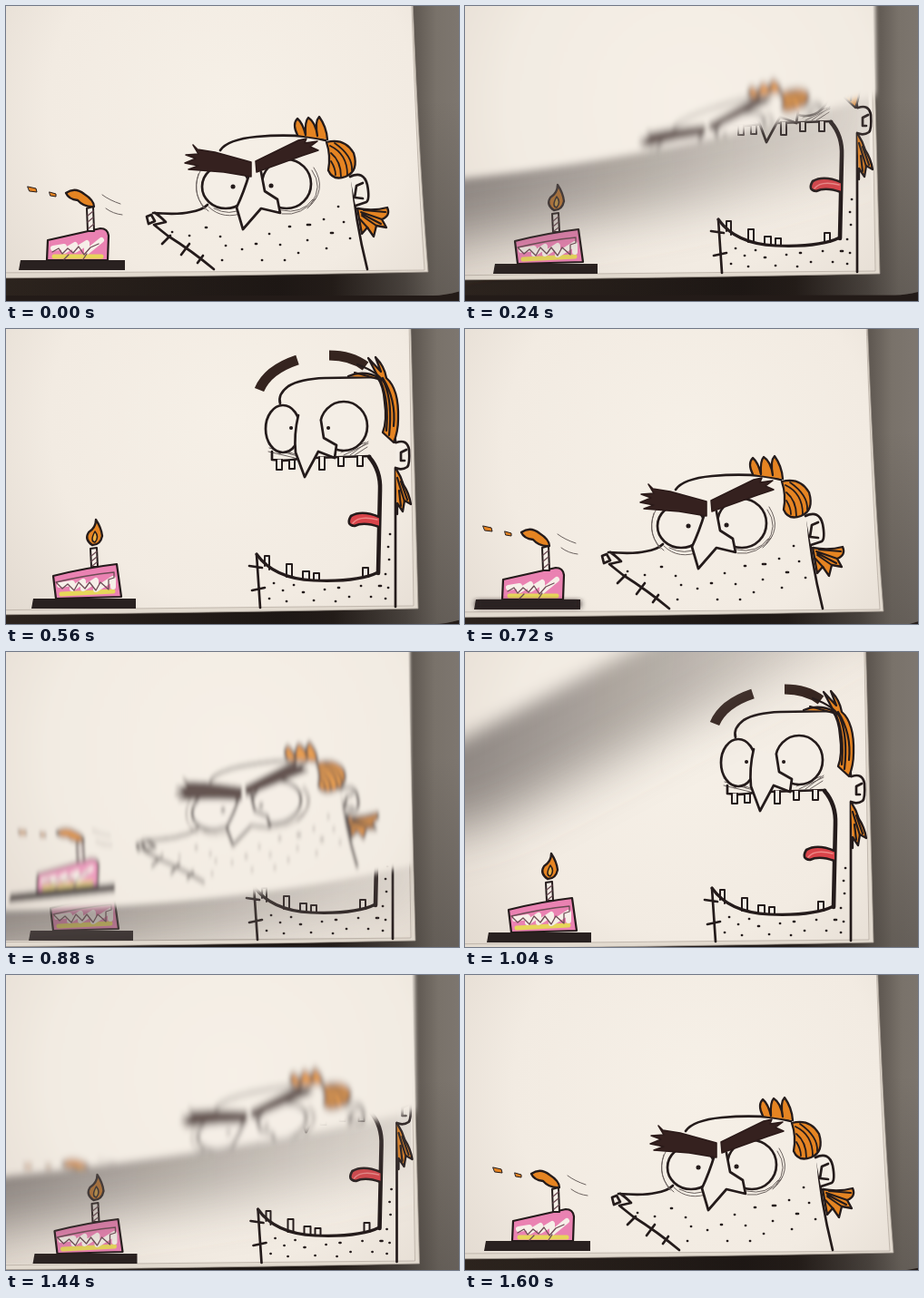
An HTML page for the animation above (1.68 s loop, 499 px wide and 325 px high).

```html
<!DOCTYPE html>
<html lang="en">
<head>
<meta charset="utf-8">
<title>Flipbook birthday</title>
<style>
html, body { margin: 0; width: 100%; height: 100%; overflow: hidden; background: #231b18; }
svg { display: block; width: 499px; height: 325px; }
.ink { fill: none; stroke: #241b1b; stroke-width: 2.7; stroke-linecap: round; stroke-linejoin: round; }
.thin { stroke-width: 1; stroke: #6b625f; }
.bold { stroke-width: 3.2; }
.heavy { stroke-width: 4.6; }
.dots { stroke-width: 2.7; }
.white { fill: #f4eee6; }
.hair { fill: #e58422; stroke-width: 2.3; }
.brow { fill: #35211f; stroke: #2b1a19; stroke-width: 1.5; }
.arch { stroke: #35241f; stroke-width: 11; stroke-linecap: butt; }
.pink { fill: #ea82b2; stroke-width: 2.2; }
.plate { fill: #292120; stroke: none; }
.icing { stroke: #f6efe8; stroke-width: 6; }
.lemon { stroke: #e6d65a; stroke-width: 5; }
.mark { stroke-width: 1.3; stroke: #6d4c55; }
</style>
</head>
<body>
<svg viewBox="0 0 499 325">
<defs>
  <radialGradient id="paper" gradientUnits="userSpaceOnUse" cx="250" cy="110" r="370">
    <stop offset="0" stop-color="#f6f0e7"/>
    <stop offset=".55" stop-color="#f2ebe2"/>
    <stop offset="1" stop-color="#ddd4ca"/>
  </radialGradient>
  <linearGradient id="mat" gradientUnits="userSpaceOnUse" x1="0" y1="0" x2="499" y2="0">
    <stop offset="0" stop-color="#30261f"/>
    <stop offset=".6" stop-color="#1d1613"/>
    <stop offset=".72" stop-color="#241c18"/>
    <stop offset=".88" stop-color="#544d47"/>
    <stop offset=".95" stop-color="#79726a"/>
    <stop offset="1" stop-color="#7d766f"/>
  </linearGradient>
  <linearGradient id="dusk" x1="0" y1="0" x2="0" y2="1">
    <stop offset=".4" stop-color="#1f1b19" stop-opacity="0"/>
    <stop offset="1" stop-color="#1f1b19" stop-opacity=".25"/>
  </linearGradient>
  <linearGradient id="shade" gradientUnits="userSpaceOnUse" x1="0" y1="0" x2="450" y2="0">
    <stop offset="0" stop-color="#5e5753" stop-opacity=".66"/>
    <stop offset=".5" stop-color="#6e6661" stop-opacity=".46"/>
    <stop offset="1" stop-color="#827a75" stop-opacity=".2"/>
  </linearGradient>
  <filter id="soft" filterUnits="userSpaceOnUse" x="-200" y="-400" width="900" height="1000"><feGaussianBlur stdDeviation="28"/></filter>
  <filter id="motion" filterUnits="userSpaceOnUse" x="-60" y="-90" width="620" height="500"><feGaussianBlur id="blur"/></filter>
  <filter id="smear" filterUnits="userSpaceOnUse" x="-20" y="260" width="200" height="60"><feGaussianBlur stdDeviation="3 2"/></filter>
  <clipPath id="cut"><path id="cutPath"/></clipPath>
  <clipPath id="sheetArea"><path d="M0 0H442L450 318H0Z"/></clipPath>

  <g id="blowing" class="ink">
    <path class="plate" d="M16 280H131V291H14Z"/>
    <path class="pink" d="M46 258L104 245Q112 245 113 253L112 280H45Z"/>
    <path class="lemon" d="M53 276H105"/>
    <path class="icing" d="M52 267L64 265V270L76 263V269L89 261V271L105 258"/>
    <path class="mark" d="M51 271l7-4 4 6 6-6 6 5 6-7 6 9 7-8 9-4M64 279l5-5M85 279l4-6"/>
    <path class="white" stroke-width="2" d="M89 223L96 221L97 248H90Z"/>
    <path class="mark" d="M90 231l6-5M90 238l6-5M91 245l6-5"/>
    <path class="hair" stroke-width="2" d="M66 206Q76 199 86 207Q97 214 97 221Q86 222 79 214Q69 213 66 206Z"/>
    <path class="hair" style="stroke-width:1" d="M24 199l9 2 1 4-8-1zM48 205l7 2v3l-6-1z"/>
    <path class="thin" d="M106 208Q114 214 126 218M110 223Q118 229 128 230"/>

    <path d="M236 159Q244 147 276 144Q323 140 352 148M162 228Q191 230 203 227Q216 225 222 219M155 232l5-2 4 7-7 3zM164 228Q169 231 176 238L163 241L178 253Q205 270 229 290M181 253l-9 9M202 262l-9 12M217 275l-6 8"/>
    <path d="M381 187Q384 234 398 290"/>
    <path class="thin" d="M215 180Q202 202 219 224M212 185Q204 211 223 226M223 221Q239 237 264 227M229 223Q247 232 260 223M337 181Q350 199 336 218M339 178Q355 203 332 223M304 229Q326 232 342 211M303 225Q326 230 338 213"/>
    <ellipse class="white" cx="242" cy="199" rx="26" ry="24"/>
    <ellipse class="white" cx="309" cy="196" rx="27" ry="27"/>
    <path d="M250 199h.1M292 198h.1" stroke-width="5"/>
    <path class="white" d="M268 185Q262 205 254 222L261 246L281 223L302 228L299 213L285 204L281 183"/>
    <path class="brow" d="M206 153L211 158L230 161L270 172V188L240 183L201 180L212 176L197 173L209 168L198 164L212 163Z"/>
    <path class="brow" d="M275 171L322 148L331 146L329 151L343 149L335 155L344 159L326 165L276 183Z"/>
    <path class="hair" d="M321 142Q315 130 321 124Q327 129 330 142Q329 127 333 123Q341 128 343 143Q340 127 345 122Q353 133 354 147"/>
    <path class="hair" d="M353 150Q373 145 383 162Q389 182 374 188Q360 193 355 181Q358 165 353 150Z"/>
    <path stroke-width="1.8" d="M357 154Q376 163 376 186M362 151Q382 165 381 181M358 162Q369 171 369 188M358 171Q363 179 363 186"/>
    <path class="white" d="M379 188Q394 181 398 197Q401 213 397 216L385 220M393 195L386 198L384 211L393 212"/>
    <path class="hair" d="M387 223Q405 226 420 222Q424 231 414 235L419 244L408 242L405 254L398 244L392 251Z"/>
    <path stroke-width="2" d="M391 227L414 235M392 231L408 242M394 225L418 227M390 235L399 245M392 229L413 240"/>
    <path class="dots" d="M183 249h.1M202 253h.1M220 244h1M236 254h.1M242 264h.1M260 268h.1M275 262h1M282 280h.1M290 251h.1M302 263h.1M312 243h1M322 272h.1M332 241h3M332 258h.1M350 235h.1M358 250h2M366 221h.1M372 238h.1M353 267h.1M238 280h.1M379 256h.1M307 280h.1"/>
  </g>

  <g id="gaping" class="ink">
    <path class="plate" d="M29 309H142V320H27Z"/>
    <path class="pink" d="M51 284Q87 275 121 271L126 307L54 309Z"/>
    <path class="lemon" d="M60 304L117 301"/>
    <path class="icing" d="M58 294L72 292V298L84 290V298L98 289V299L117 287V296"/>
    <path class="mark" d="M54 291Q88 283 118 280V286L112 288V299L103 291L98 300L91 291L86 298L79 291L74 300L67 293L61 298Z"/>
    <path class="white" stroke-width="2" d="M92 254L99 253L100 274H93Z"/>
    <path class="mark" d="M93 262l6-5M93 268l6-5M94 273l5-4"/>
    <path class="hair" d="M98 222Q104 231 105 240Q103 250 94 250Q85 244 90 236Q98 231 98 222Z"/>
    <path d="M97 235Q102 241 97 247Q91 246 97 235Z" fill="#f0b040" stroke-width="1.5"/>

    <path d="M301 94Q298 84 310 75Q323 67 350 66L412 65Q426 105 428 137M428 166V318M275 260L279 319M267 273L281 275M270 300L284 297"/>
    <path class="thin" d="M288 139l32 12M289 143l31 9M292 135l21 15M368 148l27-11M371 151l27-13M378 151l20-15M383 151l14-9M288 147l29 7M300 150l10-6"/>
    <ellipse class="white" cx="304" cy="122" rx="19" ry="26"/>
    <ellipse class="white" cx="371" cy="119" rx="26" ry="27"/>
    <path d="M313 121h.1M354 121h.1" stroke-width="4"/>
    <path d="M292 147V156Q308 158 321 155M338 154L400 152"/>
    <path class="heavy" d="M399 153Q412 168 411 190L409 281"/>
    <path class="white" stroke-width="2" d="M297 156v11h6v-11M311 157v9h6v-9M344 153v14h6v-14M365 153v10h6v-10M386 152v11h6v-11"/>
    <path class="white" d="M321 107Q316 128 318 148L328 175L343 147L361 154L363 140L349 132L346 113"/>
    <path d="M410 230Q393 224 383 229Q373 228 379 218Q391 211 410 219" fill="#d9444a"/>
    <path d="M381 226Q388 217 408 222" stroke="#ee8a88" stroke-width="1.5"/>
    <path class="white" stroke-width="2" d="M284 273v-11h5v15M308 285v-14h6v15M326 288v-9h7v10M338 289v-8h6v8M392 286v-11h6v10"/>
    <path class="bold" d="M275 260Q294 287 338 289Q387 291 409 280"/>
    <path class="arch" d="M278 79Q287 57 320 46"/>
    <path class="arch" d="M355 41Q379 41 395 53"/>
    <path class="hair" d="M376 64Q392 57 409 65L398 44L412 59L406 43Q416 53 418 66Q432 78 431 111Q431 125 426 137L414 126Q419 113 416 92Q415 75 408 65"/>
    <path stroke-width="2.2" d="M386 51Q410 60 416 72Q425 94 421 129M414 66Q429 90 426 119M383 60L412 68M412 70Q421 92 418 124"/>
    <path class="hair" d="M428 165Q434 174 437 184Q443 193 445 205L438 201L436 213L430 204V216"/>
    <path stroke-width="2.2" d="M430 176L438 202M432 190L434 207M434 180L441 200"/>
    <path class="white" d="M429 137Q441 133 443 145Q444 161 441 164Q435 168 428 165M440 145L434 148V157L438 157"/>
    <path class="dots" d="M294 292h.1M304 300h.1M289 309h.1M316 294h.1M326 302h1M338 311h.1M350 299h.1M365 297h1M377 307h.1M390 295h.1M401 307h.1M410 295h2M417 282h.1M421 266h.1M420 252h.1M417 309h.1M308 312h.1M362 312h.1M420 297h.1M422 238h.1"/>
  </g>
</defs>

<rect width="499" height="325" fill="#231b18"/>
<g id="desk">
  <path d="M-40-40H560V287Q505 319 470 319H-40Z" fill="url(#mat)"/>
  <path d="M-40-40H560V287Q505 319 470 319H-40Z" fill="url(#dusk)"/>
</g>

<g id="pageB">
  <path d="M-30-60H443L453 320Q200 325-30 327Z" fill="#e2dacf" stroke="#a39a91" stroke-width=".8"/>
  <path d="M-30-60H442L448 317Q200 319-30 322Z" fill="url(#paper)" stroke="#b8aea4" stroke-width=".8"/>
  <use href="#gaping"/>
</g>
<g clip-path="url(#sheetArea)"><path id="shadow" fill="none" stroke="url(#shade)" filter="url(#soft)"/></g>
<g id="pageA">
  <path d="M-30-60H446Q453 145 465 293Q220 298-30 300Z" fill="#e2dacf" stroke="#a39a91" stroke-width=".8"/>
  <path d="M-30-60H445Q451 145 461 291Q220 293-30 294Z" fill="url(#paper)" stroke="#b8aea4" stroke-width=".8"/>
  <use href="#blowing"/>
  <path id="smudge" d="M16 285H131" stroke="#292120" stroke-width="9" filter="url(#smear)"/>
</g>
<g id="lift" filter="url(#motion)">
  <path id="curl" fill="url(#paper)"/>
  <g clip-path="url(#cut)"><use id="bent" href="#blowing" opacity=".75"/></g>
</g>
</svg>
<script>
const STEP = 80, COUNT = 21;
const $ = id => document.getElementById(id);

// [step, x, y] drift of each drawing under the camera
const driftA = [[0, 0, 0], [2, 3, -1], [8, -3, 16], [9, -4, 18], [13, -2, 19], [18, 3, 16], [20, 7, 13]];
const driftB = [[0, 4, -26], [3, 4, -25], [7, 1, -12], [11, -2, -2], [13, -3, 0], [16, 0, 0], [20, 5, -4]];

// sheet edge heights (left, control, right), squash, slant and drop of its drawing, blur, shadow width
const rising = [
  [285, 280, 235, .85, -.1, 30, 3, 90],
  [190, 162, 98, .6, -.275, 103, 4, 130],
  [95, -35, -140, .4, -.5, -300, 11, 190]
];
const falling = [222, 196, 150, .72, -.16, 70, 4, 110];
const flips = { 2: rising[0], 3: rising[1], 4: rising[2], 8: falling,
  11: rising[0], 12: rising[1], 13: rising[2], 18: falling };

function at(keys, n) {
  const i = Math.max(1, keys.findIndex(k => k[0] >= n));
  const [a, b] = [keys[i - 1], keys[i]];
  const u = (n - a[0]) / (b[0] - a[0]);
  return [1, 2].map(j => a[j] + (b[j] - a[j]) * u);
}

const set = (id, name, value) => $(id).setAttribute(name, value);
const show = (id, on) => set(id, 'display', on ? 'inline' : 'none');
const move = (id, p) => set(id, 'transform', `translate(${p})`);

function draw(n) {
  const flip = flips[n];
  const a = at(driftA, n), b = at(driftB, n);
  const flat = !flip && (n < 2 || n === 9 || n === 10 || n > 18);
  move('pageA', a);
  move('pageB', b);
  move('desk', [flat ? a[0] : b[0], flat ? a[1] / 2 : b[1] / 2 + 12]);
  show('pageA', flat);
  show('pageB', !flat);
  show('smudge', n === 9 || n === 19);
  show('lift', flip);
  show('shadow', flip);
  if (!flip) return;

  const [left, mid, right, squash, slant, drop, blur, spread] = flip;
  const side = 446 + b[0];
  const sheet = `M-90-400H${side - 2}L${side + 3} ${right}Q250 ${mid} 0 ${left}L-90 ${left + 20}Z`;
  set('curl', 'd', sheet);
  set('cutPath', 'd', sheet);
  set('blur', 'stdDeviation', `${Math.min(blur, 4) / 2} ${blur}`);
  set('shadow', 'd', `M-90 ${left + 20}L0 ${left}Q250 ${mid} 460 ${right}`);
  set('shadow', 'stroke-width', spread);
  set('bent', 'transform', `matrix(1 ${slant} 0 ${squash} ${a[0] - 8} ${drop})`);
}

let last = -1;
function tick() {
  const n = Math.floor(performance.now() / STEP) % COUNT;
  if (n !== last) draw(last = n);
  requestAnimationFrame(tick);
}
tick();
</script>
</body>
</html>
```
